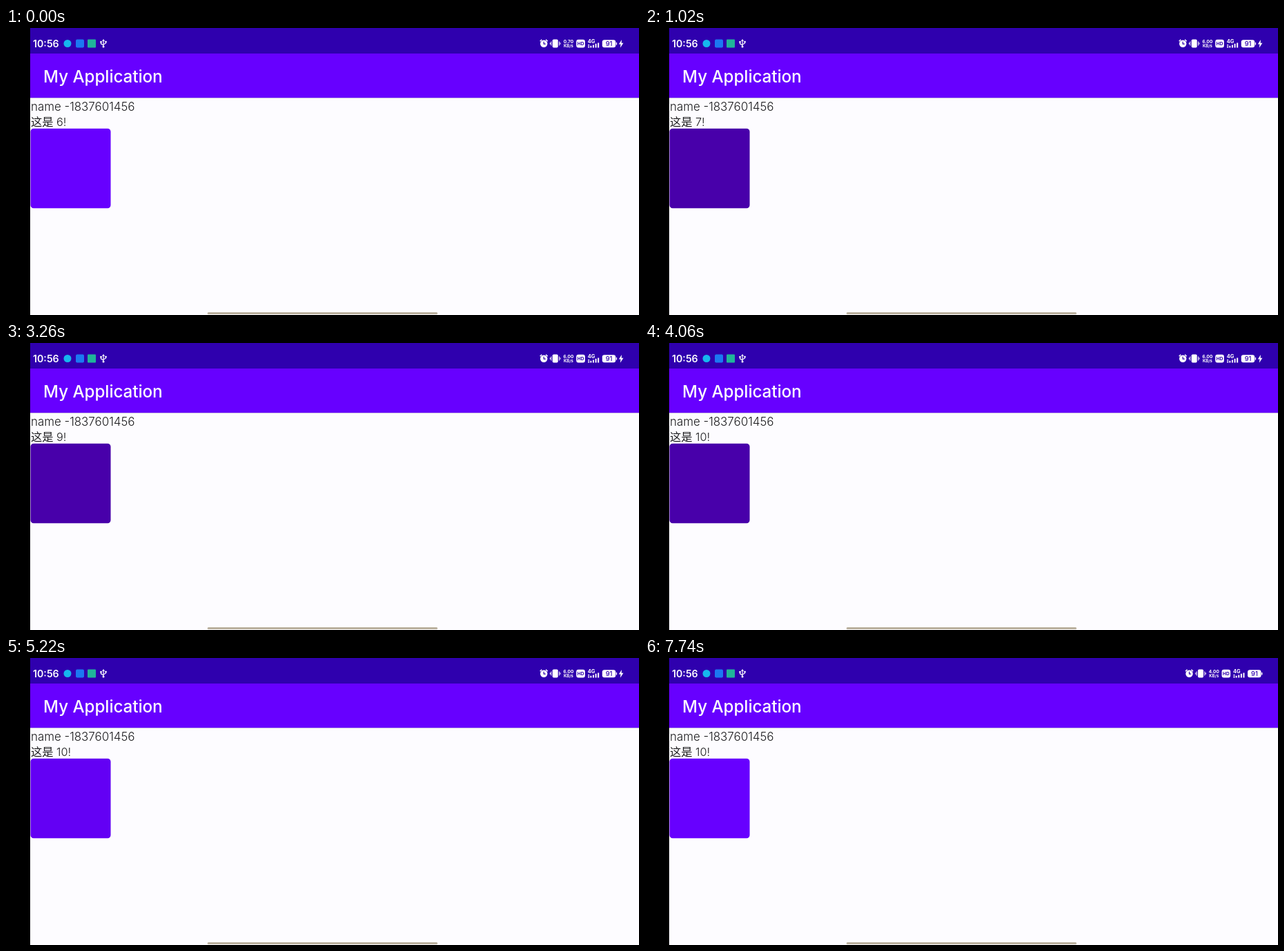
An HTML page for the animation above (7.86 s loop, 916 by 416 pixels).

```html
<!DOCTYPE html>
<html lang="zh">
<head>
<meta charset="utf-8">
<title>My Application</title>
<style>
html, body { margin: 0; width: 100%; height: 100%; overflow: hidden; background: #fdfcff; }
svg { display: block; width: 916px; height: 416px; }
text { font-family: Inter, "Noto Sans CJK SC", "Noto Sans CJK", sans-serif; }
.body { font-size: 16.3px; font-weight: 350; fill: #1c1c1e; }
.white, .status text { fill: #fff; }
.tiny { font-size: 6.6px; font-weight: 700; text-anchor: middle; }
</style>
</head>
<body>
<svg viewBox="0 0 916 416">
  <rect width="916" height="416" fill="#fdfcff"/>
  <rect y="101" width="916" height="1" fill="#c6b8e2"/>
  <rect width="916" height="37" fill="#2f00ae"/>
  <rect y="37" width="916" height="64" fill="#6700ff"/>
  <rect width="35" height="416" fill="#000"/>

  <g class="status">
    <text x="39" y="28" font-size="14.2" font-weight="600">10:56</text>
    <circle cx="89" cy="22.5" r="5.5" fill="#16b7ee"/>
    <rect x="101" y="16.5" width="12" height="12" rx="2" fill="#1c78f2"/>
    <rect x="118" y="16.5" width="12" height="12" rx="1" fill="#20b59a"/>
    <path d="M141 18v9M137.5 20.5v2.3l3.5 2.2M144.5 20v2l-3.5 2" fill="none" stroke="#fff" stroke-width="1.2"/>
    <path class="white" d="M139 19l2-3 2 3zM136.3 19h2.4v2.4h-2.4z"/>
    <circle class="white" cx="144.5" cy="20" r="1.3"/>
    <circle class="white" cx="141" cy="27" r="1.5"/>
  </g>

  <g class="status" id="icons">
    <circle class="white" cx="778.3" cy="22.8" r="5.2"/>
    <path d="M772.8 19.2l2.6-2.4M783.8 19.2l-2.6-2.4" stroke="#fff" stroke-width="1.5"/>
    <path d="M778.3 19.8v3.3h2.6" fill="none" stroke="#2f00ae" stroke-width="1.2"/>
    <rect class="white" x="790.8" y="16.5" width="8" height="12" rx="1.8"/>
    <path d="M789 19.5v6M800.6 19.5v6M787.5 21.2v2.6M802.1 21.2v2.6" stroke="#fff"/>
    <text class="tiny" id="speed" x="814" y="21.8">0.70</text>
    <text class="tiny" x="814" y="28.3" style="font-size:6px">KB/s</text>
    <rect class="white" x="825.3" y="16.8" width="12.6" height="11.6" rx="3"/>
    <text class="tiny" x="831.6" y="25.2" style="fill:#2f00ae">HD</text>
    <text class="tiny" x="847" y="21.9" style="font-size:7.5px">4G</text>
    <path class="white" d="M842.2 24h2v1.6h-2zM842.2 26.4h2v2h-2zM845.4 25.8h2v2.6h-2zM849 24.4h2v4h-2zM852.6 22.8h2v5.6h-2zM856.2 21.4h2v7h-2z"/>
    <rect class="white" x="862.8" y="17.2" width="19.4" height="11" rx="3"/>
    <rect class="white" x="882.7" y="20.8" width="1.4" height="4" rx=".7"/>
    <text x="872.6" y="26.1" font-size="9.4" font-weight="500" text-anchor="middle" style="fill:#2f00ae">91</text>
    <path class="white" id="bolt" d="M891 17l-4.2 6.6h2.7l-.7 5.2 4.6-7h-2.8z"/>
  </g>

  <text class="white" x="54" y="79" font-size="24.1" font-weight="470">My Application</text>
  <text class="body" x="36" y="119.5" style="font-size:16.9px">name -1837601456</text>
  <text class="body" x="36" y="141.5">这是</text>
  <text class="body" x="73" y="141.5" id="count">6!</text>
  <rect id="button" x="35.5" y="145.7" width="116" height="115.5" rx="4.5" fill="#6700ff"/>
  <rect x="291.5" y="412" width="333" height="3" rx="1.5" fill="#b9af9d"/>
</svg>
<script>
const LOOP = 7860;
const $ = id => document.getElementById(id);
const [icons, speed, bolt, count, button] = ['icons', 'speed', 'bolt', 'count', 'button'].map($);

const counts = [[0, 6], [600, 7], [1700, 8], [2800, 9], [3900, 10]];
const speeds = [[0, '0.70'], [80, '6.00'], [6390, '4.00']];
const IDLE = [103, 0, 255], PRESSED = [72, 0, 170];

const at = (steps, t) => steps.filter(s => s[0] <= t).pop()[1];
const ramp = (t, from, to) => Math.min(1, Math.max(0, (t - from) / (to - from)));
const easeOut = x => 1 - (1 - x) ** 3;

function render(t) {
  const press = easeOut(ramp(t, 280, 500)) - easeOut(ramp(t, 4850, 5600));
  const rgb = IDLE.map((c, i) => Math.round(c + (PRESSED[i] - c) * press));
  button.setAttribute('fill', `rgb(${rgb})`);
  count.textContent = at(counts, t) + '!';
  speed.textContent = at(speeds, t);
  bolt.setAttribute('visibility', t < 7400 ? 'visible' : 'hidden');
  icons.setAttribute('transform', `translate(${t < 7620 ? 0 : 9.3})`);
}

const start = performance.now();
function tick() {
  render((performance.now() - start) % LOOP);
  requestAnimationFrame(tick);
}
tick();
</script>
</body>
</html>
```
